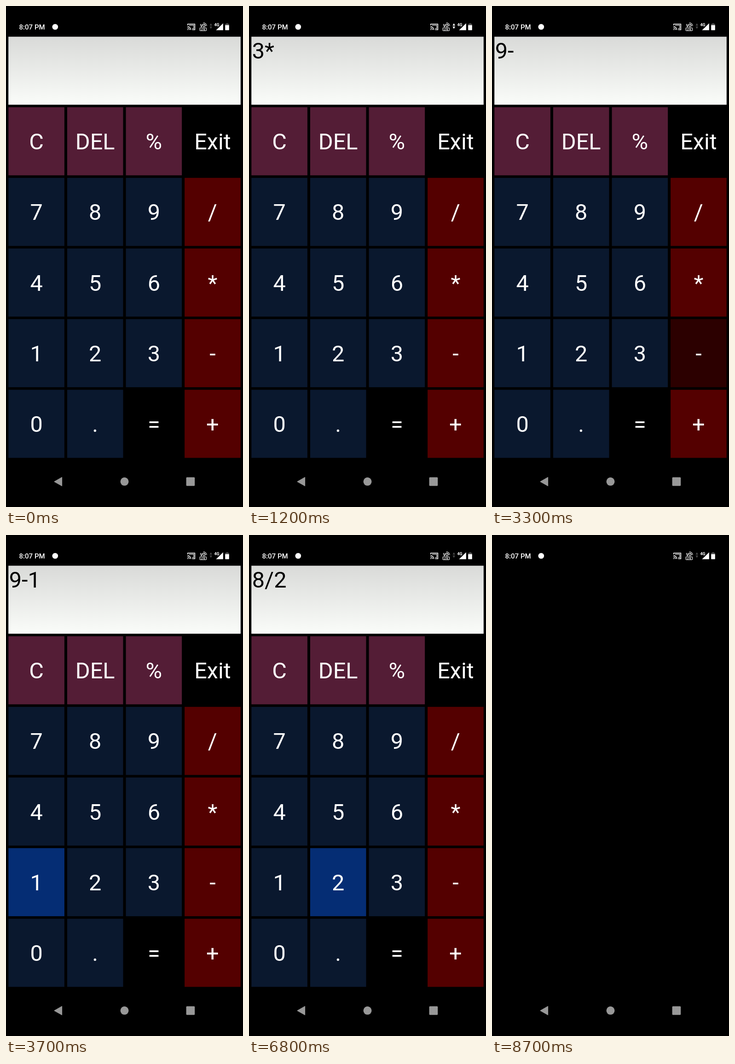
Write an HTML page that moves like this. It is 515 px wide and 1087 px high and loops after 8.8 s.

```html
<!DOCTYPE html>
<html lang="en">
<head>
<meta charset="utf-8">
<title>Calculator</title>
<style>
  html, body { margin: 0; width: 100%; height: 100%; overflow: hidden; background: #000; }
  svg { display: block; position: absolute; left: 0; top: 0; }
  text { font-family: Roboto, "Noto Sans", sans-serif; fill: #fff; white-space: pre; }
  .key { font-size: 48.6px; text-anchor: middle; }
  #entry { font-size: 48.6px; fill: #000; }
</style>
</head>
<body>
<svg width="515" height="1087" viewBox="0 0 515 1087">
  <defs>
    <linearGradient id="paper" x1="0" y1="0" x2="0" y2="1">
      <stop offset="0" stop-color="#d9dad8"/>
      <stop offset="1" stop-color="#fafcf9"/>
    </linearGradient>
  </defs>
  <rect width="515" height="1087" fill="#000"/>

  <!-- status bar -->
  <text x="28.6" y="50.6" font-size="15" font-weight="500">8:07 PM</text>
  <circle cx="106.8" cy="45.2" r="6.3" fill="#fff"/>
  <g fill="none" stroke="#fff" stroke-width="1.5">
    <path d="M394.8 42V39.2H410.4V51.4H404.6"/>
    <path d="M394.2 44.6A7.4 7.4 0 0 1 401.6 52M394.2 47.6A4.4 4.4 0 0 1 398.6 52"/>
    <path d="M397.6 41.6H408V49.2H404.4" stroke-width="1.2"/>
  </g>
  <path d="M394.1 49.9A2.2 2.2 0 0 1 396.3 52.1H394.1Z" fill="#fff"/>
  <text x="421.8" y="46.2" font-size="8.6" font-weight="700">VO</text>
  <g fill="none" stroke="#fff" stroke-width="1.1">
    <path d="M428.6 36.2A7.4 7.4 0 0 1 436 43.6M428.6 38.8A4.8 4.8 0 0 1 433.4 43.6"/>
    <rect x="421" y="47.2" width="14.6" height="6.6" rx="1.6"/>
  </g>
  <text x="428.3" y="52.8" font-size="6.2" font-weight="700" text-anchor="middle">LTE</text>
  <path id="arrows" d="M442.4 42.6L445.2 37.4L448 42.6ZM442.4 44.6L445.2 49.8L448 44.6Z"/>
  <path d="M456.4 52.6L471.8 37.4V52.6Z" fill="#fff"/>
  <path d="M452 36H463.6V45.2L461 47.6L452 46Z" fill="#000"/>
  <text x="452.4" y="44.4" font-size="8.8" font-weight="700">4G</text>
  <path d="M476.2 42V38.8H478.4V37.2H482.6V38.8H484.8V42Z" fill="#474747"/>
  <rect x="476.2" y="41.6" width="8.6" height="11" rx=".8" fill="#fff"/>

  <g id="app">
    <rect x="5.2" y="66.6" width="504.6" height="147.6" fill="url(#paper)"/>
    <text id="entry" x="6.8" y="114"></text>
  </g>

  <!-- navigation bar -->
  <g fill="#989898">
    <path d="M104.8 1032L121.6 1022.4V1041.4Z" stroke="#989898" stroke-linejoin="round"/>
    <circle cx="257.5" cy="1031.8" r="9"/>
    <rect x="391.6" y="1022.6" width="18.6" height="18.6" rx="1.6"/>
  </g>
</svg>
<script>
const LOOP = 8800;
const CLOSE = 8700;
const PLUM = "#541d36", NAVY = "#0a182e", RED = "#540000", BLACK = "#000";
const PRESSED = { [NAVY]: "#052d74", [RED]: "#2c0000" };

const ROWS = [
  ["C", "DEL", "%", "Exit"],
  ["7", "8", "9", "/"],
  ["4", "5", "6", "*"],
  ["1", "2", "3", "-"],
  ["0", ".", "=", "+"],
];

// [start ms, display text, key held down]
const STEPS = [
  [0, "", ""],
  [700, "3", "3"],
  [900, "3", ""],
  [1100, "3*", "*"],
  [1200, "3*", ""],
  [1400, "3*3", "3"],
  [1500, "3*3", ""],
  [1800, "9", ""],
  [3300, "9-", "-"],
  [3500, "9-", ""],
  [3700, "9-1", "1"],
  [3900, "9-1", ""],
  [4000, "8", ""],
  [5800, "8/", ""],
  [6800, "8/2", "2"],
  [6900, "8/2", ""],
  [7000, "4.0", ""],
];

const byId = id => document.getElementById(id);
const app = byId("app"), entry = byId("entry"), arrows = byId("arrows");

function add(tag, attrs) {
  const el = document.createElementNS("http://www.w3.org/2000/svg", tag);
  for (const name in attrs) el.setAttribute(name, attrs[name]);
  return app.appendChild(el);
}

function colorOf(label, row, col) {
  if (label === "Exit" || label === "=") return BLACK;
  if (row === 0) return PLUM;
  return col === 3 ? RED : NAVY;
}

const keys = ROWS.flatMap((labels, row) => labels.map((label, col) => {
  const x = 5.3 + 127.6 * col, y = 219.6 + 153.25 * row;
  const color = colorOf(label, row, col);
  const tile = add("rect", { x, y, width: 121.6, height: 147.8, fill: color });
  add("text", { x: x + 60.8, y: y + 91.4, class: "key" }).textContent = label;
  return { label, color, tile };
}));

function draw(t) {
  const [, text, held] = STEPS.findLast(step => step[0] <= t);
  entry.textContent = text;
  for (const { label, color, tile } of keys)
    tile.setAttribute("fill", label === held ? PRESSED[color] : color);
  arrows.setAttribute("fill", t >= 700 && t < 2000 ? "#fff" : "#474747");
  app.setAttribute("visibility", t < CLOSE ? "visible" : "hidden");
}

const start = performance.now();
function tick() {
  draw((performance.now() - start) % LOOP);
  requestAnimationFrame(tick);
}
tick();
</script>
</body>
</html>
```
